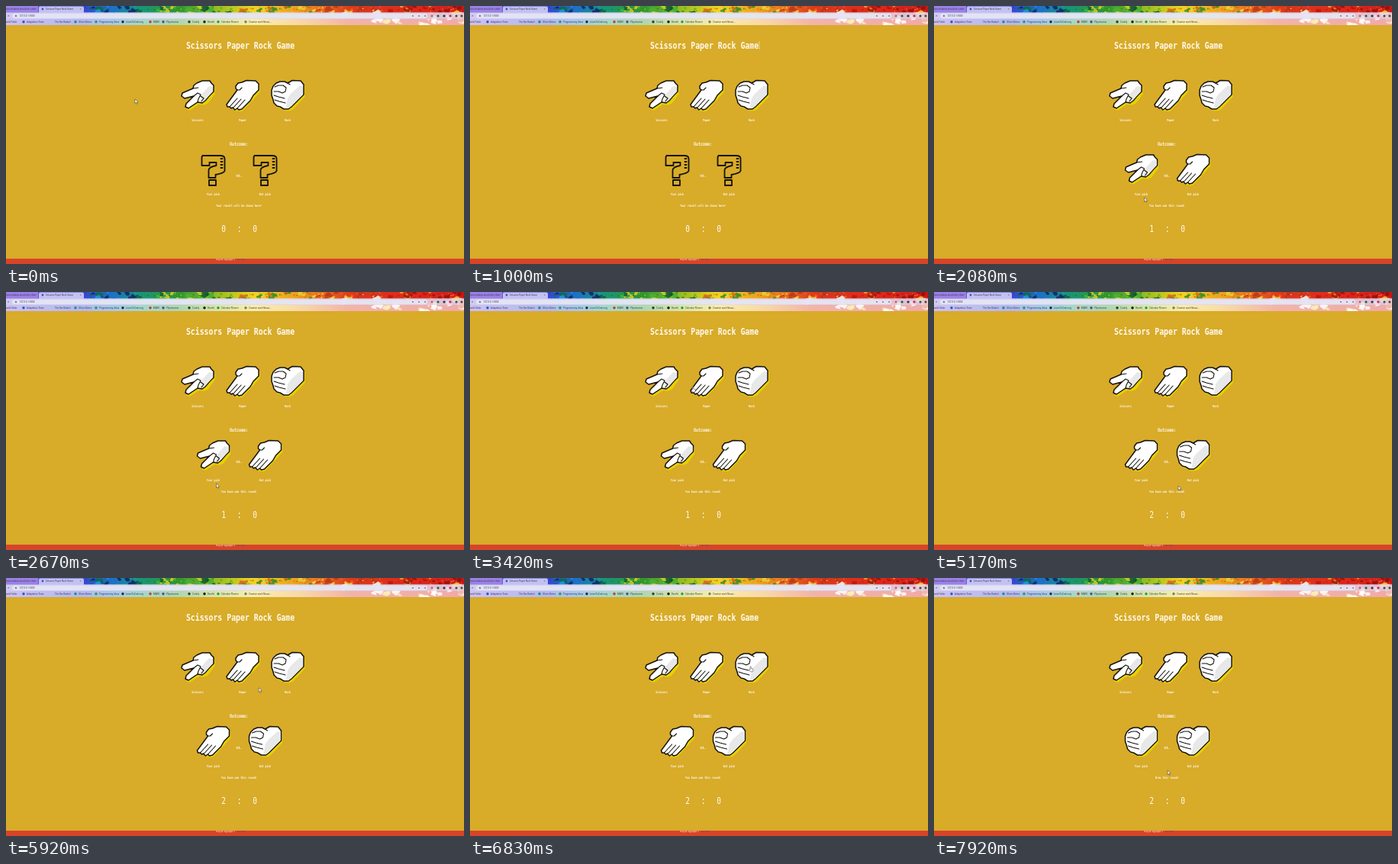
An HTML page for the animation above (8 s loop, 600 by 338 pixels).

```html
<!DOCTYPE html>
<html lang="en">
<head>
<meta charset="utf-8">
<title>Scissors Paper Rock Game</title>
<style>
  html, body { margin: 0; width: 100%; height: 100%; overflow: hidden; background: #d8ab29; }
  svg { display: block; width: 100vw; height: 100vh; }
  .mono { font-family: "DejaVu Sans Mono", "Liberation Mono", monospace; fill: #fffaf0; text-anchor: middle; }
  .ui { font: 3px Roboto, "Liberation Sans", sans-serif; fill: #3c3c58; }
  .line { fill: none; stroke: #14120c; stroke-width: 1.1; stroke-linecap: round; stroke-linejoin: round; }
  .skin { fill: #fff; stroke: #14120c; stroke-width: 1.5; stroke-linejoin: round; }
  .shade { fill: #e8e8e8; }
  .glow { fill: #e9d000; stroke: #e9d000; stroke-width: 1.4; stroke-linejoin: round; }
</style>
</head>
<body>
<svg viewBox="0 0 600 338" preserveAspectRatio="none">
  <defs>
    <linearGradient id="rainbow" gradientUnits="userSpaceOnUse" x1="0" y1="0" x2="600" y2="0">
      <stop offset="0" stop-color="#7a5ce0"/>
      <stop offset=".17" stop-color="#3449d6"/>
      <stop offset=".23" stop-color="#1c70cc"/>
      <stop offset=".29" stop-color="#16967a"/>
      <stop offset=".38" stop-color="#2f962c"/>
      <stop offset=".45" stop-color="#8cb81e"/>
      <stop offset=".54" stop-color="#f0d41c"/>
      <stop offset=".64" stop-color="#ee9a1e"/>
      <stop offset=".75" stop-color="#dd3a1d"/>
      <stop offset="1" stop-color="#d91d1a"/>
    </linearGradient>
    <clipPath id="chromeClip"><rect width="600" height="25"/></clipPath>

    <g id="scissors">
      <path class="glow" transform="translate(2 4)" d="M17 13 29 2 39 3 42 8 42 15 33 27 28 29 22 28 10 36 6 35 8 31 18 22Z"/>
      <path class="skin" d="M16 12 17 8 21 5 28 2 38 2 40 5 43 8 43 16 38 21 32 28 28 31 22 30 10 38 6 36 7 32 17 22 5 25 1 22 2 18Z"/>
      <path class="shade" d="M37 9 42 10 42 16 32 27 28 30 25 28 27 20Z"/>
      <path class="line" d="M16 12 23 11M17 22 22 18 26 20 23 26 22 30M26 22 30 25 27 29"/>
    </g>

    <g id="paper">
      <path class="glow" transform="translate(2 2.5)" d="M16 6 27 2 39 3 42 6 42 14 34 23 20 38 17 39 11 38 12 15Z"/>
      <path class="skin" d="M13 9 16 5 21 4 27 1.5 39 2 43 6 43 14 36 21 32 28 21 39 17 40 15 38 12 40 9 37 7 38 5 36 2 36 1 33 15 14 13 12Z"/>
      <path class="line" d="M15 14 18 14 21 11M5 36 15 25M10 37 20 26M15 38 25 27"/>
    </g>

    <g id="rock">
      <path class="glow" transform="translate(2 2.5)" d="M5 8 28 2 39 3 42 7 42 20 27 36 23 38 17 38 6 33 4 27Z"/>
      <path class="skin" d="M3 9 7 5 12 3 18 3 22 5 28 1.5 39 2 43 7 43 20 37 26 27 36 23 39 17 39 12 36 8 35 4 31 3 27 1 21 1 14Z"/>
      <path class="shade" d="M38 8 42 9 42 20 27 35 23 38 20 37 22 25 26 19Z"/>
      <path class="line" d="M5 10 10 8 16 8 20 11 19 16 15 18 10 16 4 16M4 21 10 23 18 25M5 27 11 29 19 31M22 5 25 7"/>
    </g>

    <g id="unknown" class="line" style="stroke-width:1.8">
      <path d="M8 3H31Q37 3 37 7V23Q36 26 25 28V32H16V22Q16 18 26 16V12H17V16H7V5Z"/>
      <path d="M16.5 35H25.5V42H16.5Z"/>
      <path d="M32 7H34M32 11H34M32 15H34M32 19H34"/>
    </g>

    <path id="arrow" d="M0 0V5.4L1.3 4.3 2.2 6.4 3.2 6 2.3 4 4 3.9Z" fill="#fff" stroke="#222" stroke-width=".45"/>
    <path id="pointer" d="M0 0Q.8-.5 1.2.2V2.4L3.8 3V5.4L3.2 6.8H.4L-1.2 4.2-.7 3.5 0 4.1Z" fill="#fff" stroke="#222" stroke-width=".45"/>
    <path id="beam" d="M-.9-2.8H.9M0-2.8V5.6M-.9 5.6H.9" fill="none" stroke="#f7ebc4" stroke-width=".6"/>
  </defs>

  <rect width="600" height="338" fill="#d8ab29"/>
  <g id="browser" clip-path="url(#chromeClip)"></g>
  <g id="page"></g>
  <rect y="331" width="600" height="7" fill="#d64529"/>
  <g id="footer"></g>
  <use id="cursor"/>
</svg>

<script>
const $ = id => document.getElementById(id);
const LOOP = 8000, STEP = 1000 / 12;

function add(parent, tag, attrs, content = "") {
  const el = document.createElementNS("http://www.w3.org/2000/svg", tag);
  for (const key in attrs) el.setAttribute(key, attrs[key]);
  el.textContent = content;
  parent.append(el);
  return el;
}

const rect = (parent, x, y, width, height, fill, rx = 0, opacity = 1) =>
  add(parent, "rect", { x, y, width, height, fill, rx, opacity });

const dot = (parent, cx, cy, r, fill, opacity = 1) =>
  add(parent, "circle", { cx, cy, r, fill, opacity });

const ui = (x, y, text) => add($("browser"), "text", { x, y, class: "ui" }, text);

// Condensed monospace lettering shared by the whole page
const mono = (x, y, size, text, weight = 700, parent = $("page")) =>
  add(parent, "text", {
    class: "mono", "font-size": size, "font-weight": weight,
    transform: `translate(${x} ${y}) scale(.77 1)`
  }, text);

function randomizer(seed) {
  return () => (seed = seed * 16807 % 2147483647) / 2147483647;
}

// Ragged blot with uneven radius
function blot(parent, x, y, r, fill, rnd) {
  let d = "";
  for (let i = 0; i < 9; i++) {
    const a = i / 9 * 2 * Math.PI, k = r * (.45 + rnd());
    d += `${i ? "L" : "M"}${(x + k * Math.cos(a) * 1.3).toFixed(1)} ${(y + k * Math.sin(a)).toFixed(1)}`;
  }
  add(parent, "path", { d: d + "Z", fill, opacity: .85 });
}

function paintSplashes(g) {
  const rnd = randomizer(77);
  const inks = [
    ["#10206c", "#1b98e6", "#0f6a3c"],
    ["#0c5a30", "#46b23a", "#d8cf2a"],
    ["#e8d23a", "#2c8c2c", "#d8651c"],
    ["#f4dc4c", "#e8641c", "#b8341c"],
    ["#8e1212", "#f0a024", "#c01414"]
  ];
  for (let i = 0; i < 260; i++) {
    const x = 104 + rnd() * 496;
    const zone = inks[Math.floor((x - 100) / 100.1)];
    blot(g, x, rnd() * 9, .5 + rnd() ** 3 * 3.5, zone[Math.floor(rnd() * 3)], rnd);
  }
  for (let i = 0; i < 40; i++)
    blot(g, 400 + Math.sqrt(rnd()) * 200, 9 + rnd() * 16, 1.5 + rnd() * 3, ["#fff", "#f3d43a", "#dd2a20"][i % 3], rnd);
}

function drawBrowser() {
  const g = $("browser");
  rect(g, 0, 0, 600, 25, "url(#rainbow)");
  paintSplashes(g);
  rect(g, 0, 8.5, 600, 16.5, "#fff", 0, .62);
  rect(g, 0, 0, 42, 8.5, "#9a80e6");
  rect(g, 43, .5, 59, 10, "#c3c0f2", 2);
  rect(g, 0, 8.5, 600, 8.5, "#d6d2f2", 0, .6);
  rect(g, 8, 9.7, 544, 6.5, "#e6e6f4", 3.2, .9);

  ui(0, 5, "low meadow area bird v chat");
  ui(38, 5.2, "×");
  dot(g, 48, 4, 1.4, "#4650b4");
  ui(52, 5.2, "Scissors Paper Rock Game");
  ui(97, 5.2, "×");
  ui(105, 5.4, "+");
  ui(2, 14, "⟳");
  dot(g, 13, 13, 1.2, "#777790");
  ui(17.5, 14, "127.0.0.1:5500");

  for (const x of [533, 541, 549]) dot(g, x, 13, 1.1, "#85858c");
  [[558, "#e7584d"], [566, "#24603a"], [574, "#333"], [582, "#d02438"], [590, "#4a4a4a"], [597, "#6b3730"]]
    .forEach(([x, color]) => dot(g, x, 13, 1.6, color));

  const marks = [
    [0, "", "web Folder"], [27, "#2858c4", "Adaptation Tests"],
    [64, "", "The Dev Basket"], [95, "#148a91", "Olive's Notes"],
    [122, "#1e9c4a", "Programming Ideas"], [157, "#24243c", "LearnToCode.org"],
    [193, "#d0342c", "MARE"], [210, "#5b419c", "Playmorrow"],
    [244, "#333", "Codely"], [264, "#111", "Reedle"],
    [282, "#2b9648", "Calendar Planner"], [318, "#777", "Creative work Resou..."]
  ];
  for (const [x, color, label] of marks) {
    if (color) dot(g, x - 4, 20.7, 1.7, color);
    ui(x, 21.8, label);
  }
}

const place = (name, x, y) =>
  add($("page"), "use", { href: "#" + name, transform: `translate(${x} ${y})` });

drawBrowser();
mono(307, 55.5, 12.8, "Scissors Paper Rock Game");
place("scissors", 229, 96);
place("paper", 288, 96);
place("rock", 347, 96);
mono(251, 151.4, 4.2, "Scissors");
mono(310, 151.4, 4.2, "Paper");
mono(369, 151.4, 4.2, "Rock");
mono(305, 182.7, 6.5, "Outcome:");
const yours = place("unknown", 249.5, 193);
const bots = place("unknown", 317.5, 193);
mono(305.3, 224, 5.8, "vs.");
mono(271.5, 248, 4.2, "Your pick");
mono(339.5, 248, 4.2, "Bot pick");
const result = mono(305.3, 262.8, 4.2, "");
const wins = mono(285, 295.5, 12.4, "0", 400);
mono(305.5, 295.5, 12.4, ":", 400);
mono(326, 295.5, 12.4, "0", 400);
mono(287.5, 333.4, 2.8, "Project Copyright ©", 700, $("footer"));
mono(308, 333.4, 2.8, "Ivo Tarn", 700, $("footer")).style.fill = "#7a3c86";

// time, yours, bot's, wins, message
const rounds = [
  [0, "unknown", "unknown", 0, "Your result will be shown here!"],
  [1660, "scissors", "paper", 1, "You have won this round!"],
  [3660, "paper", "rock", 2, "You have won this round!"],
  [7330, "rock", "rock", 2, "Draw this round!"]
];

// time, x, y of the cursor tip
const path = [
  [0, 169, 122], [830, 379, 50], [1250, 379, 50], [1600, 250, 116],
  [1700, 250, 116], [2050, 275.5, 251], [2750, 275.5, 251], [3400, 291, 124.5],
  [3580, 306, 118], [3750, 306, 118], [4250, 320, 254], [5500, 320, 254],
  [5900, 331, 144], [6320, 367, 116], [7370, 367, 116], [7800, 306, 252],
  [8000, 306, 252]
];

function cursorAt(t) {
  const i = path.findIndex(p => p[0] > t);
  const [t0, x0, y0] = path[i - 1], [t1, x1, y1] = path[i];
  const k = (t - t0) / (t1 - t0), e = k * k * (3 - 2 * k);
  return [x0 + (x1 - x0) * e, y0 + (y1 - y0) * e];
}

function cursorShape(x, y) {
  const overPick = y > 97 && y < 138 && [229, 288, 347].some(left => x > left && x < left + 44);
  if (overPick) return "pointer";
  return y > 44 && y < 59 && x > 236 && x < 381 ? "beam" : "arrow";
}

function draw(now) {
  const t = Math.floor((now % LOOP + 4) / STEP) * STEP % LOOP;
  const [, mine, theirs, score, message] = rounds.filter(r => r[0] <= t).pop();
  yours.setAttribute("href", "#" + mine);
  bots.setAttribute("href", "#" + theirs);
  wins.textContent = score;
  result.textContent = message;

  const [x, y] = cursorAt(t);
  $("cursor").setAttribute("href", "#" + cursorShape(x, y));
  $("cursor").setAttribute("transform", `translate(${x} ${y})`);
}

function tick() {
  draw(performance.now());
  requestAnimationFrame(tick);
}
tick();
</script>
</body>
</html>
```
